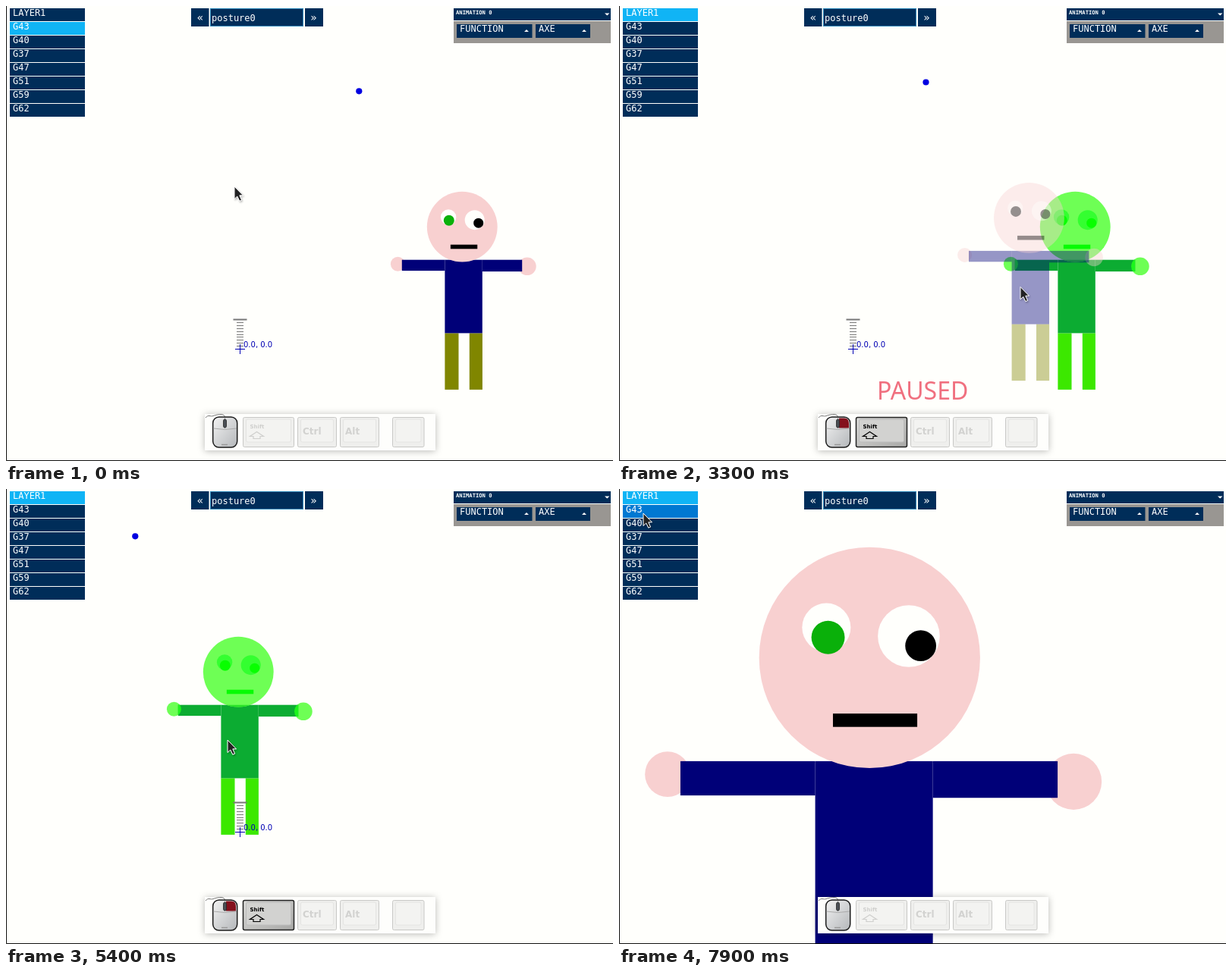
These frames come from a looping animation (800 by 600 pixels, 8000 ms). An HTML page:

```html
<!DOCTYPE html>
<html lang="en">
<head>
<meta charset="utf-8">
<title>Posture editor</title>
<style>
  html, body { margin: 0; width: 100%; height: 100%; overflow: hidden; background: #fffffc; }
  svg { display: block; width: 800px; height: 600px; }
  text { white-space: pre; }
  .mono { font: 12px "DejaVu Sans Mono", monospace; fill: #fff; }
  .tiny { font: bold 7.2px "DejaVu Sans Mono", monospace; fill: #fff; }
  .chev { font: 14px "DejaVu Sans", sans-serif; fill: #fff; text-anchor: middle; }
  .coord { font: 10px "DejaVu Sans", sans-serif; fill: #0000b4; }
  .paused { font: 32px "Noto Sans", "Open Sans", sans-serif; fill: #f0707f; }
  .key { font: bold 12px "DejaVu Sans", sans-serif; fill: #d2d2d0; }
  .shift { font: bold 7px "DejaVu Sans", sans-serif; }
</style>
</head>
<body>
<svg id="stage" viewBox="0 0 800 600" xmlns="http://www.w3.org/2000/svg"></svg>
<script>
const LOOP = 8000, STEP = 100;
const NAVY = '#002d59', HOVER = '#0078d2', PICKED = '#10b4f5', GREEN = '#0ab00a';
const ROWS = ['LAYER1', 'G43', 'G40', 'G37', 'G47', 'G51', 'G59', 'G62'];
const PIVOT = { x: 295, y: 250 };

// Moves: [start, steps, ...end]; one step every 100 ms.
const CURSOR = [
  [0, 1, 301, 238], [500, 1, 239, 188], [700, 3, 85, 10], [1300, 2, 77, 5],
  [1600, 3, 671, 390], [2200, 2, 587, 381], [3200, 1, 574, 379], [3300, 5, 349, 336],
  [3800, 3, 303, 328], [4100, 1, 302, 327], [4300, 3, 293, 328], [4700, 4, 292, 331],
  [5600, 4, 295, 250], [6800, 3, 41, 1], [7200, 4, 35, 48], [7900, 1, 32, 32]
];
const DRAG = [
  [0, 1, 0, 0], [3200, 1, -15, -3], [3300, 5, -244, -47], [3800, 3, -284, -54],
  [4300, 3, -294, -54], [4700, 4, -295, -50]
];
const ZOOM = [[0, 1, 0], [6200, 5, 12]];

function track(moves, t) {
  let pos = moves[0].slice(2);
  for (const [start, steps, ...end] of moves) {
    if (t < start) break;
    const k = Math.min(1, (Math.floor((t - start) / STEP) + 1) / steps);
    pos = pos.map((v, i) => v + (end[i] - v) * k);
  }
  return pos;
}

const within = (t, a, b) => t >= a && t < b;
const rect = (x, y, w, h, fill, more = '') =>
  `<rect x="${x}" y="${y}" width="${w}" height="${h}" fill="${fill}" ${more}/>`;
const circle = (x, y, r, fill, more = '') =>
  `<circle cx="${x}" cy="${y}" r="${r}" fill="${fill}" ${more}/>`;
const path = (d, more) => `<path d="${d}" ${more}/>`;
const text = (x, y, cls, s, more = '') => `<text x="${x}" y="${y}" class="${cls}" ${more}>${s}</text>`;

const SKIN = '#f8d0d0', SHIRT = '#000078', TROUSERS = '#808600';
const LIME = '#6eff55', LEAF = '#0cac32';
const HEAD = [601.25, 291.2, 46.4], HAND_L = [516.4, 340.2, 9.5], HAND_R = [686.9, 343.3, 11.8];
const BODY = [578.4, 334.7, 49.4, 96.7], ARM_L = [521.8, 334.7, 56.6, 14.4], ARM_R = [627.8, 334.7, 52.4, 15.4];

// [draw, geometry, plain colour, tinted colour, list row]
const PARTS = [
  [circle, HAND_L, SKIN, LIME],
  [circle, HAND_R, SKIN, LIME],
  [rect, [578.4, 431.4, 18.1, 74.5], TROUSERS, '#3ce800'],
  [rect, [610.8, 431.4, 17.1, 74.5], TROUSERS, '#3ce800'],
  [rect, ARM_L, SHIRT, LEAF],
  [rect, ARM_R, SHIRT, LEAF],
  [rect, BODY, SHIRT, LEAF],
  [circle, HEAD, SKIN, LIME],
  [circle, [583.1, 278.5, 10.2], '#fffffc', '#34ff30'],
  [circle, [617.7, 282.15, 13], '#fffffc', '#34ff30'],
  [circle, [583.8, 282.7, 7], '#000', '#08ff00', 1],
  [circle, [622.7, 286.2, 6.5], '#000', '#08ff00', 2],
  [rect, [585.85, 314.7, 35.4, 5.6], '#000', '#08fb05', 3]
];
const OVERLAPS = [['armL', HAND_L, '#1cf51c'], ['armR', HAND_R, '#1cf51c'], ['body', HEAD, '#2ae228']]
  .map(([id, c, fill]) => circle(...c, fill, `clip-path="url(#${id})"`)).join('');

function figure(lit, alpha = 1) {
  const more = alpha < 1 ? `opacity="${alpha}"` : '';
  const body = PARTS.map(([draw, geo, plain, tint, row]) =>
    draw(...geo, lit === 0 ? tint : lit && row === lit ? GREEN : plain, more)).join('');
  return lit === 0 ? body + OVERLAPS : body;
}

const clip = (id, geo) => `<clipPath id="${id}">${rect(...geo, '#000')}</clipPath>`;
const gradient = (id, a, b) => `<linearGradient id="${id}" x2="1" y2="1">
  <stop stop-color="${a}"/><stop offset="1" stop-color="${b}"/></linearGradient>`;

function key(x, w, label, on) {
  return rect(x, 542.5, w, 39, on ? 'url(#keyOn)' : '#efefed', `rx="2" stroke="${on ? '#222' : '#c8c8c6'}" stroke-width="${on ? 1.5 : 1}"`) +
    rect(x + 4, 545, w - 8, 30, on ? '#d2d2d0' : '#f3f3f1', `rx="2" stroke="${on ? '#bbb' : '#e4e4e2'}"`) +
    text(x + 6.5, 565, 'key', label);
}

function shiftKey(on) {
  const ink = on ? '#000' : '#cfcfcd';
  return key(312.5, 67, '', on) + text(321.5, 557, 'shift', 'Shift', `fill="${ink}"`) +
    path('M330.5 561.5l-9 6h4.5v3h9v-3h4.5z', `fill="none" stroke="${ink}" stroke-width="1.2"`);
}

function mouse(button) {
  const red = 'fill="#84101c"';
  let s = path('M263 543c4-5 6-1 10-2.500s14-4 15.500 1', 'fill="none" stroke="#777"') +
    rect(272.7, 542, 32, 40, 'url(#shell)', 'rx="8" stroke="#1c1c1c" stroke-width="1.500"');
  if (button === 'left') s += path('M287.500 543.500h-7q-6 0-6 7v6h13z', red);
  if (button === 'right') s += path('M290 543.500h7q6 0 6 7v6h-13z', red);
  s += path('M273.500 557q15 3 30.500 0M288.500 543v14', 'fill="none" stroke="#aaa"') +
    path('M284 578.500h8', 'stroke="#999" stroke-width="1.500"');
  return s + (button === 'wheel'
    ? path('M288.500 556v-11M284.500 549l4-5 4 5', 'fill="none" stroke="#111" stroke-width="2"')
    : rect(286.5, 545, 4, 11, '#4a4f55', 'rx="2" stroke="#222" stroke-width=".8"'));
}

const bars = rect(244, 3, 23.5, 24, NAVY) + text(255.8, 20, 'chev', '«') +
  rect(269.5, 3.5, 122, 23, NAVY, 'stroke="#2585b8"') + text(271, 20, 'mono', 'posture0') +
  rect(394, 3, 24, 24, NAVY) + text(405.5, 20, 'chev', '»') +
  rect(590, 3, 207, 16, NAVY) + text(593, 11, 'tiny', 'ANIMATION 0') +
  rect(590, 20, 207, 29, '#999692') +
  rect(594, 24, 99.5, 18, NAVY) + text(598, 34, 'mono', 'FUNCTION') +
  rect(698, 24, 72, 18, NAVY) + text(702, 34, 'mono', 'AXE') +
  path('M789 9.500h6.500l-3.250 3zM683 34h6l-3-3zM759 34h6l-3-3z', 'fill="#fff"');

const list = ROWS.map((name, i) =>
  rect(5, 3 + 18 * i, 99, 17, NAVY, 'class="row"') + text(9, 13 + 18 * i, 'mono', name)).join('');

const svg = document.getElementById('stage');
svg.innerHTML = `<defs>
  ${clip('armL', ARM_L)}${clip('armR', ARM_R)}${clip('body', BODY)}
  ${gradient('keyOn', '#dededc', '#a8a8a6')}${gradient('shell', '#f2f2f2', '#b4b7ba')}
  <filter id="soft" x="-10%" y="-40%" width="120%" height="180%">
    <feDropShadow dx="0" dy="1" stdDeviation="5" flood-color="#000" flood-opacity=".28"/></filter>
  <filter id="shade" x="-50%" y="-50%" width="200%" height="200%">
    <feDropShadow dx="1" dy="1.500" stdDeviation="1" flood-color="#000" flood-opacity=".3"/></filter>
  </defs>
  ${rect(0, 0, 800, 600, '#fffffc')}
  <g id="actor"></g><g id="ghost"></g>
  <path id="ruler" stroke="#777" fill="none"/><path id="ruleTop" stroke="#777" stroke-width="2"/>
  <path id="cross" stroke="#0000b4"/>
  ${text(0, 0, 'coord', '0.0, 0.0', 'id="coord"')}
  ${circle(0, 0, 4.1, '#0000e1', 'id="dot"')}
  ${list}${bars}
  ${text(340, 519, 'paused', 'PAUSED', 'id="paused"')}
  ${path('M.5 0V599.500H800', 'fill="none" stroke="#111"')}
  ${rect(262, 538, 304, 48, '#fefefc', 'filter="url(#soft)"')}
  <g id="mouse"></g><g id="shift"></g>
  ${key(384.5, 51, 'Ctrl')}${key(440.5, 51, 'Alt')}${key(509.5, 41.5, '')}
  <g id="cursor" filter="url(#shade)">${path('M0 0V16.500L3.800 13L6.800 19.200L9.600 18L6.800 11.800H11.500Z',
    'fill="#222" stroke="#fff" stroke-width="1" stroke-linejoin="round"')}</g>`;

const $ = id => document.getElementById(id);
const rows = [...svg.querySelectorAll('.row')];
const set = (id, attrs) => Object.entries(attrs).forEach(([k, v]) => $(id).setAttribute(k, v));
const show = (id, on) => set(id, { visibility: on ? 'visible' : 'hidden' });
const cache = {};
function fill(id, html) {
  if (cache[id] !== html) $(id).innerHTML = cache[id] = html;
}

function draw(t) {
  const [cx, cy] = track(CURSOR, t), [dx, dy] = track(DRAG, t);
  const zoom = 1.1 ** Math.round(track(ZOOM, t)[0]);
  const sx = x => PIVOT.x + (x - PIVOT.x) * zoom, sy = y => PIVOT.y + (y - PIVOT.y) * zoom;
  const place = (x, y) => `translate(${sx(0)} ${sy(0)}) scale(${zoom}) translate(${x} ${y})`;

  const picked = t < 1300 ? 1 : 0;
  const over = cx >= 5 && cx < 104 && cy >= 3 && cy < 146 ? Math.floor((cy - 3) / 18) : -1;
  rows.forEach((row, i) => row.setAttribute('fill', i === picked ? PICKED : i === over ? HOVER : NAVY));

  const dropped = t >= 5400, dragging = within(t, 3200, 5400);
  fill('actor', figure(over < 0 ? picked : over));
  set('actor', { transform: place(dropped ? dx : 0, dropped ? dy : 0) });
  fill('ghost', dragging ? figure(-1, 0.41) : '');
  set('ghost', { transform: place(dx, dy) });
  set('dot', { cx: sx(465.3 + dx), cy: sy(112.3 + dy) });

  const ox = Math.floor(sx(308)) + .5, oy = Math.floor(sy(452)) + .5, gap = 3.9 * zoom;
  let ticks = '';
  for (let i = 1; i < 10; i++) ticks += `M${ox - 4.5} ${Math.floor(oy - gap * i) + .5}h9`;
  set('ruler', { d: ticks });
  set('ruleTop', { d: `M${ox - 9} ${oy - gap * 10}h18` });
  set('cross', { d: `M${ox - 6.5} ${oy}h13M${ox} ${oy - 6.5}v13` });
  set('coord', { x: ox + 4.5, y: oy - 2.5 });

  show('paused', [[2500, 2900], [3300, 3800], [4100, 4700], [4900, 5200]].some(([a, b]) => within(t, a, b)));
  fill('mouse', mouse(within(t, 1300, 1600) ? 'left' : within(t, 3000, 5600) ? 'right' : within(t, 6200, 6800) ? 'wheel' : ''));
  fill('shift', shiftKey(within(t, 2200, 5800)));
  set('cursor', { transform: `translate(${cx} ${cy})` });
}

const begin = performance.now();
function tick() {
  draw((performance.now() - begin) % LOOP);
  requestAnimationFrame(tick);
}
tick();
</script>
</body>
</html>
```
